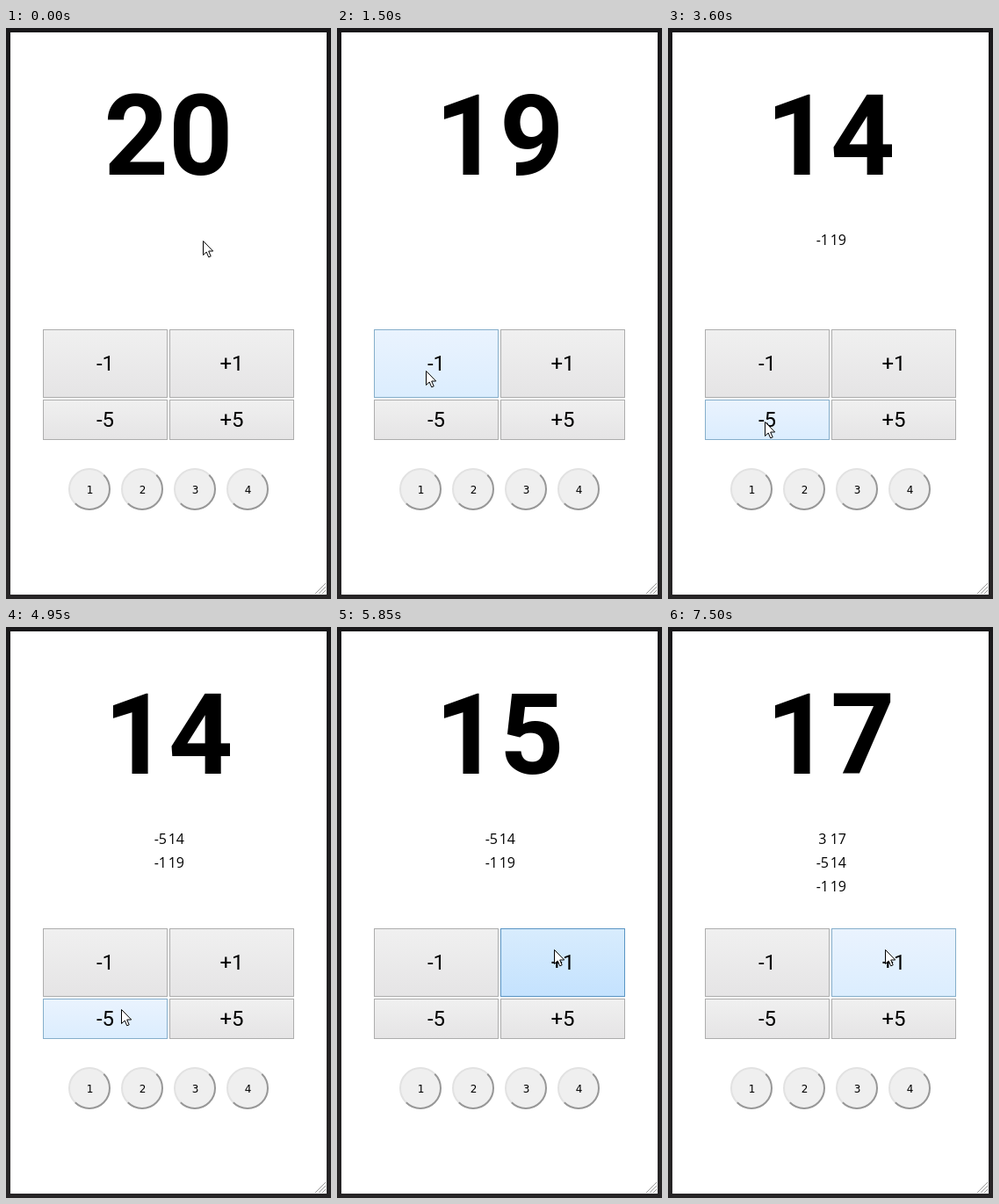
These frames come from a looping animation (370x650 px, 8 s). An HTML page with a canvas:

```html
<!DOCTYPE html>
<html lang="en">
<head>
<meta charset="utf-8">
<title>Life counter</title>
<style>
  html, body { margin: 0; width: 100%; height: 100%; overflow: hidden; background: #fff; }
  canvas { display: block; }
</style>
</head>
<body>
<canvas id="stage" width="370" height="650"></canvas>
<script>
const ctx = document.getElementById('stage').getContext('2d');
const LOOP = 8000, STEP = 150;

// Button looks: top colour, bottom colour, border
const LOOKS = {
  normal:  ['#f0f0f0', '#e5e4e5', '#adadad'],
  focus:   ['#f0f0f0', '#e5e4e5', '#5a93cc'],
  hover:   ['#eaf3fe', '#dbedfe', '#85aecb'],
  pressed: ['#d8ecfd', '#c4e2fe', '#5a95c4']
};
const BUTTONS = [
  { label: '-1', x: 42, y: 343, h: 78 },
  { label: '+1', x: 186, y: 343, h: 78 },
  { label: '-5', x: 42, y: 423, h: 46 },
  { label: '+5', x: 186, y: 423, h: 46 }
];
const BUTTON_W = 142;

// Pointer stops: time, x, y
const PATH = [
  [450, 224, 242], [1200, 101, 386], [1350, 101, 390],
  [2700, 101, 390], [3300, 110, 448],
  [4800, 110, 448], [5400, 244, 364], [5550, 247, 367]
];
// Each press lasts one step; the score changes on release
const CLICKS = [
  { at: 1350, label: '-1', score: 19 },
  { at: 3450, label: '-5', score: 14 },
  { at: 5550, label: '+1', score: 15 },
  { at: 5850, label: '+1', score: 16 },
  { at: 6150, label: '+1', score: 17 }
];
const HISTORY = [
  { at: 2700, change: '-1', score: '19' },
  { at: 4800, change: '-5', score: '14' },
  { at: 7500, change: '3', score: '17' }
];

function text(str, x, y, font, align = 'center') {
  ctx.font = font;
  ctx.textAlign = align;
  ctx.fillStyle = '#000';
  ctx.fillText(str, x, y);
}

function line(x1, y1, x2, y2, color) {
  ctx.strokeStyle = color;
  ctx.lineWidth = 1;
  ctx.beginPath();
  ctx.moveTo(x1, y1);
  ctx.lineTo(x2, y2);
  ctx.stroke();
}

function drawWindow() {
  const edge = ctx.createLinearGradient(0, 0, 0, 650);
  edge.addColorStop(0, '#19181a');
  edge.addColorStop(1, '#272526');
  ctx.fillStyle = edge;
  ctx.fillRect(0, 0, 370, 650);
  ctx.fillStyle = '#fff';
  ctx.fillRect(5, 5, 360, 640);
  for (const d of [12, 8, 4]) line(364 - d, 644, 364, 644 - d, '#999');
}

function drawButton({ label, x, y, h }, look) {
  const [top, bottom, border] = LOOKS[look];
  const fill = ctx.createLinearGradient(0, y, 0, y + h);
  fill.addColorStop(0, top);
  fill.addColorStop(1, bottom);
  ctx.fillStyle = fill;
  ctx.fillRect(x, y, BUTTON_W, h);
  ctx.strokeStyle = border;
  ctx.lineWidth = 1;
  ctx.strokeRect(x + .5, y + .5, BUTTON_W - 1, h - 1);
  text(label, x + BUTTON_W / 2, y + h / 2 + 8, '24px Roboto, sans-serif');
}

function drawRound(n) {
  const x = 35 + n * 60, y = 525, q = Math.PI / 4;
  const arc = (r, from, to) => { ctx.beginPath(); ctx.arc(x, y, r, from, to); };
  ctx.fillStyle = '#efefef';
  arc(23.5, 0, 8 * q);
  ctx.fill();
  ctx.lineWidth = 2;
  ctx.strokeStyle = '#e2e2e2';
  arc(23, 3 * q, 7 * q);
  ctx.stroke();
  ctx.strokeStyle = '#979797';
  arc(23, -q, 3 * q);
  ctx.stroke();
  text(n, x + .5, 530, '12px "DejaVu Sans", sans-serif');
}

function drawPointer([x, y]) {
  const arrow = new Path2D('M.5 .5V16.5L4.2 13L6.7 18.8L9.2 17.8L6.7 12H11.7Z');
  ctx.save();
  ctx.translate(x, y);
  ctx.fillStyle = '#fff';
  ctx.fill(arrow);
  ctx.strokeStyle = '#000';
  ctx.lineWidth = 1;
  ctx.stroke(arrow);
  ctx.restore();
}

function pointerAt(t) {
  const i = PATH.findIndex(p => p[0] > t);
  if (i === 0) return PATH[0].slice(1);
  if (i < 0) return PATH[PATH.length - 1].slice(1);
  const [t0, x0, y0] = PATH[i - 1], [t1, x1, y1] = PATH[i];
  const p = (t - t0) / (t1 - t0), k = p * p * (3 - 2 * p);
  return [Math.round(x0 + (x1 - x0) * k), Math.round(y0 + (y1 - y0) * k)];
}

function draw(t) {
  const pointer = pointerAt(t), [px, py] = pointer;
  const pressed = CLICKS.find(c => t >= c.at && t < c.at + STEP);
  const last = CLICKS.filter(c => t >= c.at).pop();
  const done = CLICKS.filter(c => t >= c.at + STEP).pop();

  drawWindow();
  text(done ? done.score : 20, 185, 167, 'bold 128px Roboto, sans-serif');

  HISTORY.filter(h => t >= h.at).reverse().forEach((h, i) => {
    const y = 247 + i * 27, font = '16px "Open Sans", "Noto Sans", sans-serif';
    text(h.change, 175.8, y, font);
    text(h.score, 184.7, y, font, 'left');
  });

  for (const b of BUTTONS) {
    const over = px >= b.x && px < b.x + BUTTON_W && py >= b.y && py < b.y + b.h;
    const look = pressed && pressed.label === b.label ? 'pressed'
      : over ? 'hover'
      : last && last.label === b.label ? 'focus' : 'normal';
    drawButton(b, look);
  }
  for (let n = 1; n <= 4; n++) drawRound(n);
  drawPointer(pointer);
}

const start = performance.now();
function tick() {
  const t = (performance.now() - start) % LOOP;
  draw(Math.floor(t / STEP) * STEP);
  requestAnimationFrame(tick);
}
tick();
</script>
</body>
</html>
```
